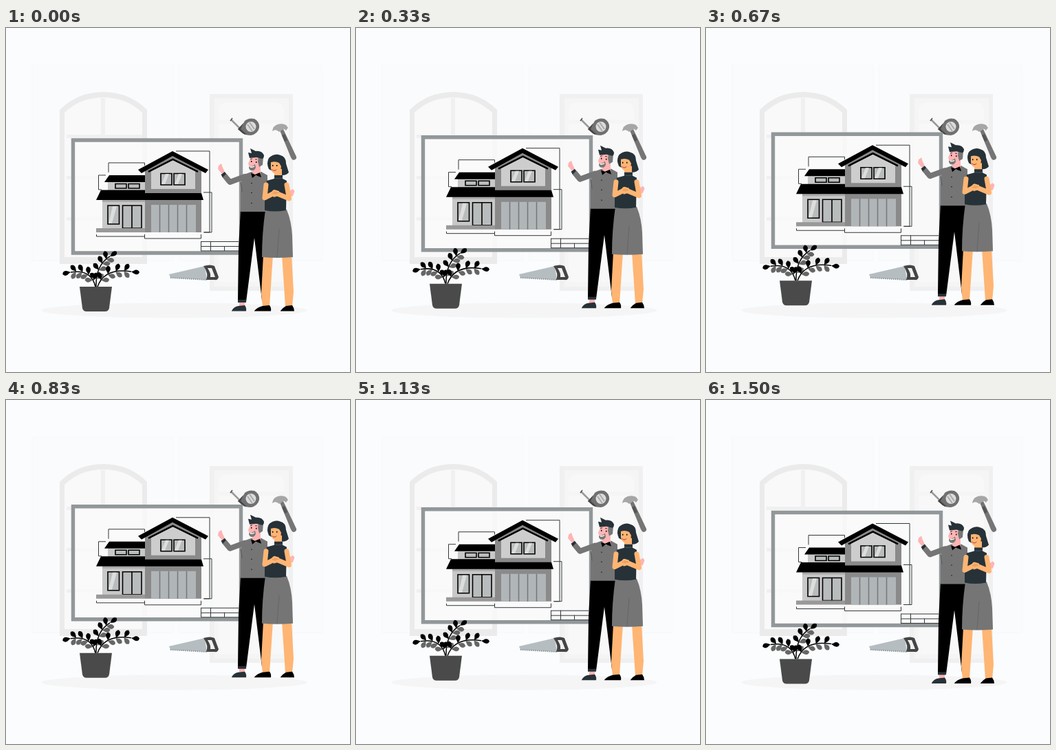
These frames come from a looping animation (500x500 px, 1.54 s). An HTML page:

```html
<!DOCTYPE html>
<html lang="en">
<head>
<meta charset="utf-8">
<title>House plan</title>
<style>
  html, body { margin: 0; width: 100%; height: 100%; overflow: hidden; background: #fafcfe; }
  svg { display: block; width: 100%; height: 100%; }
  .line { fill: none; stroke: #33383b; stroke-width: 1; }
  .glass { fill: #b9bcbd; stroke: #000; stroke-width: 1.6; }
  .ink { fill: #000; }
  .navy { fill: #263238; }
  .cloth { fill: #757575; }
  .rosy { fill: #ffb4b4; }
  .tan { fill: #ffb573; }
  .limb { fill: none; stroke-linecap: round; stroke-linejoin: round; }
</style>
</head>
<body>
<svg viewBox="0 0 500 500">
  <!-- room -->
  <g fill="#fafbfc" stroke="#f6f8fa">
    <path d="M38 54H243V338H38ZM252 54H460V338H252Z"/>
  </g>
  <path d="M78 343V119Q104 93 141.500 93T205 119V343Z" fill="#ebebeb"/>
  <path d="M85 333V123Q108 101 141.500 101T198 123V333Z" fill="#f9f9f9"/>
  <path d="M138 102H144V155H138ZM88 155H198V160H88ZM88 215H198V220H88ZM88 275H198V280H88Z" fill="#f0f0f0"/>
  <path d="M296 96H417V382H296Z" fill="#f0f0f0"/>
  <path d="M303 102H411V376H303Z" fill="#f5f5f5"/>
  <path d="M309 133V122Q309 108 324 108H390Q404 108 404 122V133ZM309 139H404V255H309ZM309 270H404V369H309Z" fill="#f8f8f8"/>
  <ellipse cx="244.500" cy="410.500" rx="193" ry="11" fill="#f5f5f5"/>

  <!-- tape measure -->
  <path d="M327 133L340 146" stroke="#999" stroke-width="2.500"/>
  <path d="M326 135L329 131" stroke="#555" stroke-width="1.500"/>
  <path d="M337 147Q345 140 347 135Q353 130 361 132Q369 136 368 145Q366 154 356 156Q348 156 344 153Z" fill="#707070"/>
  <path d="M337 147L345 138L341 147L350 155Q346 155 344 153Z" fill="#454545"/>
  <circle cx="356" cy="143.500" r="7.500" fill="#dcdcdc"/>
  <path d="M351 140L358 150M354 137L361 147" stroke="#aaa" stroke-width="2"/>

  <!-- hammer -->
  <path d="M398 149L403 147L422 187Q423 191 418 192Q415 191 414 188Z" fill="#757575"/>
  <path d="M401 156L405 154L409 163L405 165Z" fill="#555"/>
  <path d="M387 150Q388 142 395 140Q402 138 407 141L410 145L407 149Q403 145 402 148L397 151Q392 146 387 150Z" fill="#a6a6a6"/>

  <!-- saw -->
  <path d="M237 358L289 346L292 366L239 363Z" fill="#b6bdc0"/>
  <path d="M239 363L292 366" stroke="#8b9194" stroke-width="2" stroke-dasharray="1.500 1.500"/>
  <path d="M287 346Q297 343 303 346L309 362Q308 367 303 366L291 366Q295 357 287 346ZM293 349Q298 356 297 362H304L299 349Z" fill="#454545" fill-rule="evenodd"/>

  <g id="scene">
    <!-- board -->
    <path d="M97.500 163H341.500V327H97.500Z" fill="#fafafa" fill-opacity=".8" stroke="#92979a" stroke-width="5.400"/>
    <path class="line" d="M283.500 310.500H338M283.500 317.500H338M283.500 310V324M297.500 310V324M317.500 317V324M283 324H338"/>
    <path class="line" d="M149 210V196H201.500V200M145 214H134.500V235H139M247 179H296V297H287M287 239H299V297H288M131.500 300V303H201M201.500 300V306H283.500V300"/>

    <!-- house, left wing -->
    <path d="M148 223H202V237H148ZM140 249H202V292H140Z" fill="#c8c8c8"/>
    <path class="ink" d="M143 224L150 214H202V224Z"/>
    <path d="M140 250H202V253H140Z" fill="#aaa"/>
    <path class="glass" d="M159 226.500H175V233H159ZM178 226.500H194V233H178ZM148 258H164.500V285H148Z"/>
    <path d="M155 259H161L154 284H149Z" fill="#ddd"/>
    <path class="glass" d="M169.500 258H183V291H169.500ZM183 258H197V291H183Z"/>
    <path d="M131 291H202V297H131Z" fill="#999"/>

    <!-- house, right wing -->
    <path d="M202 297V203L242.500 184L284 203V297Z" fill="#8a8a8a"/>
    <path d="M211 234V207L242.500 191L275 207V234Z" fill="#cdcdcd"/>
    <path d="M207 209L242.500 191L279 209" fill="none" stroke="#000" stroke-width="2.500"/>
    <path class="ink" d="M192 206L242 179L294 206L290 211L242 186L197 211Z"/>
    <path class="glass" d="M225 211.500H241V228H225ZM244 211.500H260V228H244Z"/>
    <path d="M232 212H237L231 227H226ZM251 212H256L250 227H245Z" fill="#ddd"/>
    <path class="ink" d="M131 250L138 235.500H202V240H284L287 250Z"/>
    <path d="M211 257H276V297H211Z" fill="#b0b5b8"/>
    <path d="M223.500 257V297M236.500 257V297M249.500 257V297M262.500 257V297" stroke="#777" stroke-width="1.500"/>

    <!-- plant -->
    <g id="plant"></g>
    <path d="M107 376H154L150 407Q149 412 144 412H117Q112 412 111 407Z" fill="#4a4a4a"/>

    <!-- man -->
    <path class="rosy" d="M412 237L417 234L419.500 237L417 244L411 246ZM339 392H347V405H339ZM375 388H382V405H376Z"/>
    <path class="navy" d="M328 411Q331 405 338 404L347 403Q350 407 349 411.500H328Z"/>
    <path class="ink" d="M341 264H379L383 395L372 396L361 305L349 398L337 397L338 320Z"/>
    <path class="navy" d="M337 395H349V399H337ZM372 393H383V397H372Z"/>
    <path class="rosy" d="M313 211L308 205L309 200L313 197L315 203L317 207L318 211Z"/>
    <path class="limb" d="M318 215L325.500 224L347 216" stroke="#757575" stroke-width="8"/>
    <path d="M312.500 213L318 209L320 212L315 217Z" class="navy"/>
    <path class="cloth" d="M343 214L357 209H371L380 214V267H341V240Z"/>
    <path d="M341 224L343 238" stroke="#555"/>
    <path class="rosy" d="M358 202H370V213L363 215L358 210Z"/>
    <path class="rosy" d="M355 190Q354 183 362 183L371 186Q374 190 371 198Q367 209 359 207Q353 206 353 200L352 197Z"/>
    <path d="M353 202Q359 201 362 198L363 203Q361 208 356 207Q353 206 353 202Z" fill="#777"/>
    <path d="M355 202Q358 203 361 201" stroke="#fff" stroke-width="1.500" fill="none"/>
    <path class="line" d="M355 191L358 190M362 191L365 191"/>
    <path class="ink" d="M356 193h1.400v2h-1.400ZM363 194h1.400v2h-1.400Z"/>
    <path d="M367 187H374L373 199L368 202L366 194Z" fill="#777"/>
    <path class="navy" d="M354 189L352 181L357 182L355 175L363 179Q372 178 375 185Q375 190 372 190L364 188Z"/>
    <path class="ink" d="M356 211L362 213L369 210L371 217L363 214L358 218Z"/>
    <path d="M357 225v1M357 239v1M357 254v1" stroke="#222" stroke-width="2"/>

    <!-- woman -->
    <path class="tan" d="M374 330H388L383 405H373L371 386ZM401 330H415L418 384L416 405H406Z"/>
    <path class="ink" d="M361 411Q365 406 373 404L383 403Q386 407 385 411.500H361ZM399 411Q403 406 407 404L416 403Q419 407 419 411.500H399Z"/>
    <path class="cloth" d="M377 264H408Q415 281 416 302L417 333Q394 335 372 333Q372 299 377 264Z"/>
    <path d="M397 292L394 333" stroke="#666"/>
    <path class="navy" d="M382 190Q389 181 399 185Q407 187 407 197L411 210Q406 216 396 213L382 205Q378 196 382 190Z"/>
    <path class="tan" d="M390 205H401V220H390Z"/>
    <path class="tan" d="M385 194Q390 190 397 194L400 200Q400 208 394 212Q386 212 385 204Z"/>
    <path class="navy" d="M381 197Q379 186 391 185Q404 184 406 197L403 206L397 196Q389 192 381 197Z"/>
    <path class="ink" d="M387 199h1.400v2h-1.400ZM393 199h1.400v2h-1.400Z"/>
    <path class="limb" d="M387 206Q390 209 393 206" stroke="#a34" stroke-width="1"/>
    <path class="navy" d="M379 222L390 219V214H402V219L408 222L407 265Q391 268 376 265V245Z"/>
    <path d="M390 218Q396 220 402 218" fill="none" stroke="#46545b"/>
    <path class="limb tan-arm" d="M378 228L376 247L390 240M408 228L411.500 248L390 239" stroke="#ffb573" stroke-width="7"/>
    <path class="tan" d="M385 239L390 235L397 237L396 244L389 246Z"/>
    <path d="M387 240L393 241M389 238L396 240" stroke="#c98245" stroke-width=".7"/>
  </g>
</svg>
<script>
  const plant = document.getElementById('plant');
  const scene = document.getElementById('scene');
  const LOOP = 1540, LIFT = 10;

  function draw(attrs) {
    const path = document.createElementNS('http://www.w3.org/2000/svg', 'path');
    for (const key in attrs) path.setAttribute(key, attrs[key]);
    plant.append(path);
  }

  function leaf(x, y, angle, fill) {
    draw({ d: 'M0 0Q3 -1 5 -3Q9 -5 12 -1Q11 4 6 3Q3 2 0 0Z', fill,
           transform: `translate(${x} ${y}) rotate(${angle})` });
  }

  // A quadratic stem with pairs of leaves and one at its tip.
  function stem(x0, y0, cx, cy, x1, y1) {
    draw({ d: `M${x0} ${y0}Q${cx} ${cy} ${x1} ${y1}`, fill: 'none', stroke: '#000', 'stroke-width': 1.5 });
    const at = (a, b, c, t) => (1 - t) ** 2 * a + 2 * t * (1 - t) * b + t * t * c;
    const slope = (a, b, c, t) => (1 - t) * (b - a) + t * (c - b);
    const dark = x1 < x0 ? 1 : -1;
    for (const t of [0.2, 0.45, 0.67, 0.86, 1]) {
      const x = at(x0, cx, x1, t), y = at(y0, cy, y1, t);
      const angle = Math.atan2(slope(y0, cy, y1, t), slope(x0, cx, x1, t)) * 180 / Math.PI;
      if (t === 1) leaf(x, y, angle, '#000');
      else for (const side of [-1, 1]) leaf(x, y, angle + side * 55, side === dark ? '#000' : '#666');
    }
  }

  stem(130, 376, 124, 350, 94, 355);
  stem(131, 376, 130, 345, 151, 332);
  stem(133, 376, 143, 348, 182, 354);

  function frame() {
    const phase = ((performance.now() + 40) % LOOP) / LOOP;
    const rise = LIFT * (1 - Math.abs(1 - 2 * phase));
    scene.setAttribute('transform', `translate(0 ${0.5 - rise})`);
    requestAnimationFrame(frame);
  }
  frame();
</script>
</body>
</html>
```
